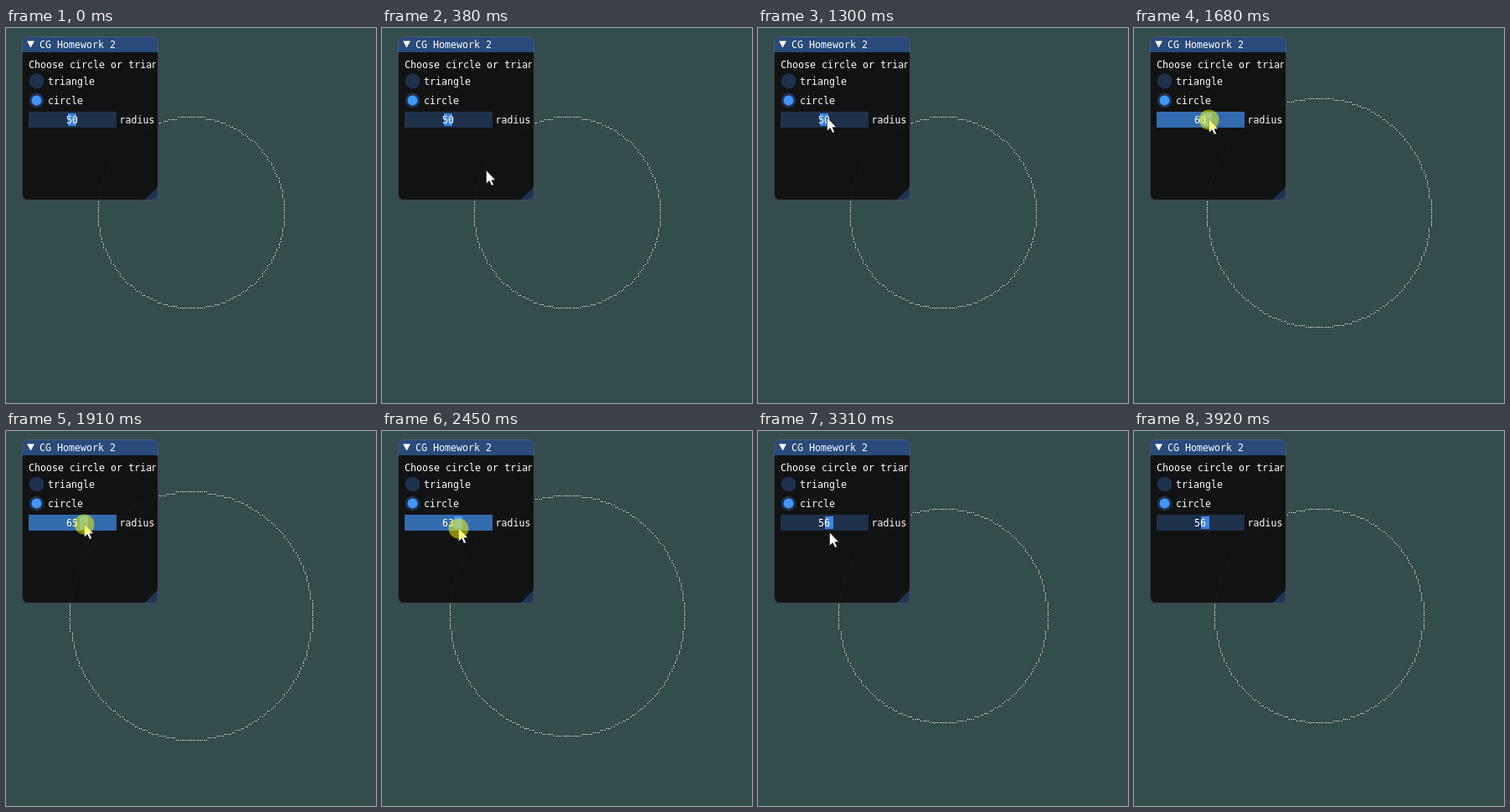
An HTML page with a canvas that plays this animation: 442 by 448 pixels, repeating every 4240 ms.

```html
<!DOCTYPE html>
<html lang="en">
<head>
<meta charset="utf-8">
<title>Circle radius slider</title>
<style>
  html, body { margin: 0; width: 100%; height: 100%; overflow: hidden; background: #334c4c; }
  canvas { display: block; width: 442px; height: 448px; }
</style>
</head>
<body>
<canvas id="stage" width="442" height="448"></canvas>
<script>
const ctx = document.getElementById('stage').getContext('2d');
const LOOP = 4240, STEP = 76.7;
const SHOW = 70, PRESS = 1380, RELEASE = 3310, HIDE = 3920;
const ENTRY = { x: 357, y: 450 };
const SLIDER = { x: 27, y: 100, w: 105, h: 19, zero: 34, unit: 0.91 };
const FRAME = '#1e314b', ACCENT = '#4296fa';
const FONT = '11.65px "DejaVu Sans Mono", "Liberation Mono", monospace';

// Pointer moves: first step, last step, where it ends.
const moves = [
  { from: SHOW, to: 530, x: 67, y: 101 },
  { from: 610, to: 680, x: 40, y: 86 },
  { from: 850, to: 1300, x: 82, y: 107 },
  { from: 1680, to: 1760, x: 96, y: 110 },
  { from: 1910, to: 1910, x: 93, y: 111 },
  { from: 1990, to: 1990, x: 78, y: 112 },
  { from: 2300, to: 2450, x: 91, y: 116 },
  { from: 2680, to: 2760, x: 92, y: 118 },
  { from: 3070, to: 3140, x: 85, y: 121 },
  { from: 3380, to: 3770, x: 440, y: 432 }
];

const smooth = p => p * p * (3 - 2 * p);

// Every move runs in even steps of about STEP ms, the first one at its start.
function progress({ from, to }, t) {
  const last = Math.round((to - from) / STEP);
  if (t >= to || !last) return 1;
  const step = Math.floor((t - from) / (to - from) * last);
  return smooth((step + 1) / (last + 1));
}

function pointerAt(t) {
  let { x, y } = ENTRY;
  for (const m of moves) {
    if (t < m.from) break;
    const p = progress(m, t);
    x = Math.round(x + (m.x - x) * p);
    y = Math.round(y + (m.y - y) * p);
  }
  return { x, y };
}

function radiusAt(t) {
  if (t < PRESS) return 50;
  const { x } = pointerAt(Math.min(t, RELEASE));
  return Math.round((x - SLIDER.zero) / SLIDER.unit);
}

function rect(x, y, w, h, color) {
  ctx.fillStyle = color;
  ctx.fillRect(x, y, w, h);
}

function disc(x, y, r, color) {
  ctx.fillStyle = color;
  ctx.beginPath();
  ctx.arc(x, y, r, 0, Math.PI * 2);
  ctx.fill();
}

function poly(points, color) {
  ctx.fillStyle = color;
  ctx.beginPath();
  points.forEach(([x, y]) => ctx.lineTo(x, y));
  ctx.closePath();
  ctx.fill();
}

function label(text, x, y) {
  ctx.fillStyle = '#fff';
  ctx.fillText(text, x, y);
}

// Bresenham circle on a coarse grid, one screen pixel per grid point.
function dottedCircle(r) {
  const dot = (x, y) =>
    ctx.fillRect(Math.floor(221.5 + x * 2.226), Math.floor(220.98 + y * 2.28), 1, 1);
  ctx.fillStyle = '#fff';
  let x = 0, y = r, d = 3 - 2 * r;
  while (x <= y) {
    for (const sx of [-1, 1]) for (const sy of [-1, 1]) {
      dot(sx * x, sy * y);
      dot(sx * y, sy * x);
    }
    d += d < 0 ? 4 * x + 6 : 4 * (x - y--) + 10;
    x++;
  }
}

function panelFrame() {
  ctx.save();
  ctx.beginPath();
  ctx.roundRect(19, 10, 163, 196, 7);
  ctx.fillStyle = 'rgba(15,15,15,.94)';
  ctx.fill();
  ctx.clip();
  rect(19, 10, 163, 19, '#294a7a');
  poly([[182, 189], [182, 206], [165, 206]], '#1d3450');
  ctx.restore();

  ctx.beginPath();
  ctx.roundRect(19.5, 10.5, 162, 195, 6.5);
  ctx.strokeStyle = 'rgba(110,110,128,.5)';
  ctx.lineWidth = 1;
  ctx.stroke();
  poly([[25, 15.6], [34, 15.6], [29.5, 23.4]], '#fff');
}

function radio(text, y, checked) {
  disc(36.5, y, 9, FRAME);
  if (checked) disc(36.5, y, 6, ACCENT);
  label(text, 50, y + 4.5);
}

function slider(value, active) {
  const { x, y, w, h, zero, unit } = SLIDER;
  const grab = Math.round(zero + value * unit - 5.4);
  rect(x, y, w, h, active ? '#326bae' : FRAME);
  rect(grab, y + 2, 10, h - 4, active ? ACCENT : '#3d85e0');
  label(String(value), 72, y + 14);
  label('radius', x + w + 3.5, y + 14);
}

function panel(value, active) {
  panelFrame();
  ctx.save();
  ctx.beginPath();
  ctx.rect(20, 11, 159, 194);
  ctx.clip();
  label('CG Homework 2', 40, 24);
  label('Choose circle or triangle', 27, 48);
  radio('triangle', 63.5, false);
  radio('circle', 86.5, true);
  slider(value, active);
  ctx.restore();
}

function arrow({ x, y }) {
  ctx.save();
  ctx.translate(x + 0.5, y);
  poly([[0, 0], [0, 16], [3.7, 12.6], [6.5, 18.3], [9, 17.2], [6.4, 11.7], [11, 11.5]], '#fff');
  ctx.strokeStyle = 'rgba(0,0,0,.7)';
  ctx.lineWidth = 0.7;
  ctx.stroke();
  ctx.restore();
}

function draw(t) {
  const active = t >= PRESS && t < RELEASE;
  rect(0, 0, 442, 448, '#334c4c');
  ctx.font = FONT;
  const radius = radiusAt(t);
  dottedCircle(radius);
  panel(radius, active);
  if (t < SHOW || t >= HIDE) return;
  const at = pointerAt(t);
  arrow(at);
  if (active) disc(at.x + 0.5, at.y + 0.5, 12, 'rgba(255,255,0,.5)');
}

const begin = performance.now();
function tick() {
  draw((performance.now() - begin) % LOOP);
  requestAnimationFrame(tick);
}
tick();
</script>
</body>
</html>
```
